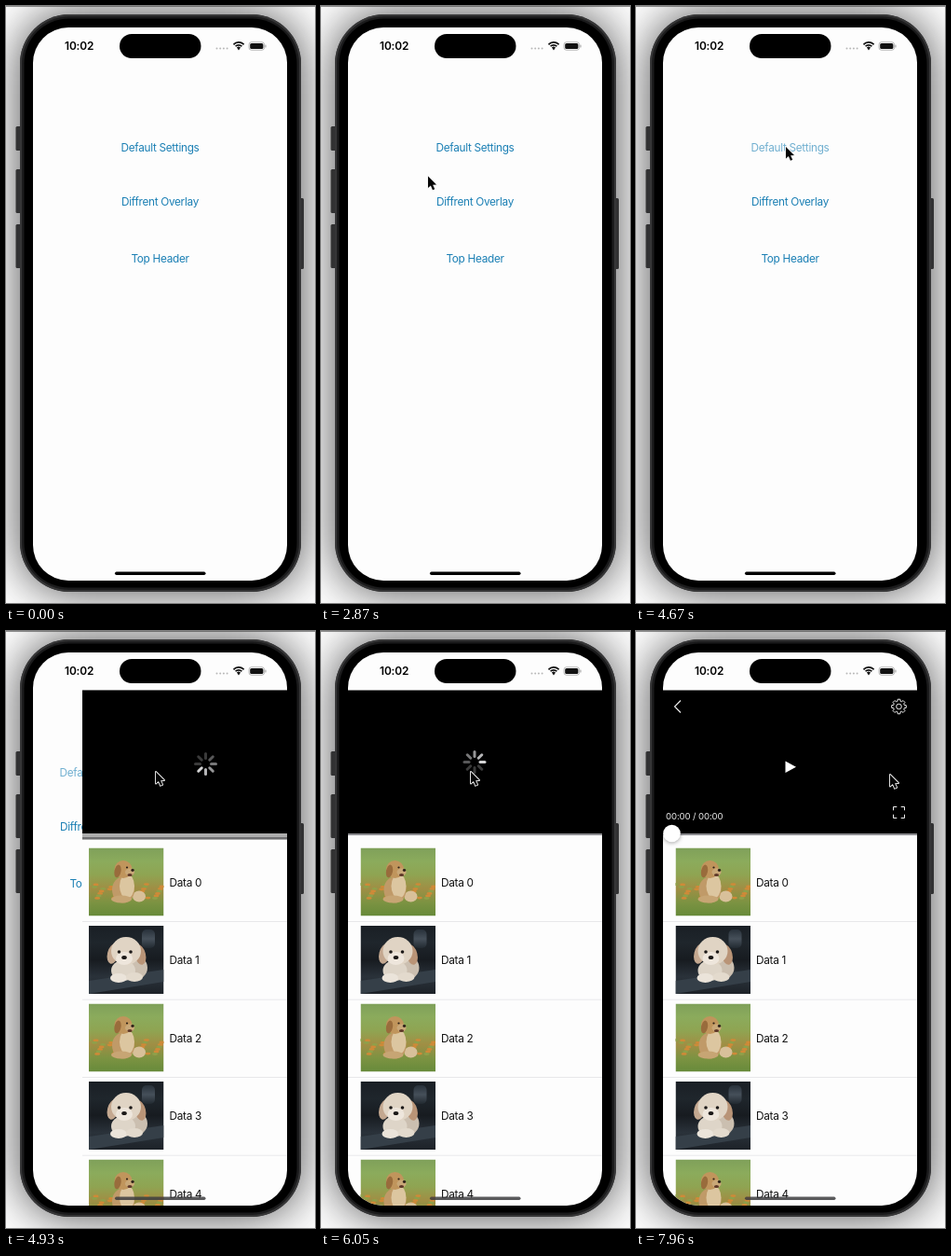
Recreate the animation shown at these times as an HTML page with a canvas. Size 332 px wide and 640 px high, loop 8 s.

```html
<!DOCTYPE html>
<html lang="en">
<head>
<meta charset="utf-8">
<title>Phone demo</title>
<style>
html, body { margin: 0; width: 100%; height: 100%; overflow: hidden; background: #fff; }
canvas { display: block; width: 332px; height: 640px; }
</style>
</head>
<body>
<canvas id="stage"></canvas>
<script>
const W = 332, H = 640, LOOP = 8000;
const canvas = document.getElementById('stage');
const ctx = canvas.getContext('2d');
const scale = window.devicePixelRatio || 1;
canvas.width = W * scale;
canvas.height = H * scale;

const SCREEN = { x: 29, y: 23, w: 273, h: 593, r: 38 };
const PAPER = '#fdfdfd', TINT = '#1a7fb4', LIGHT = '#eeeeee';
const PRESS = 4500, PUSH = 4750, PUSHED = 5180, SETTLE = 5330, READY = 6800;

// time, x, y of the pointer tip
const POINTER = [
  [2540, 30, 262], [2870, 115, 182.5], [3250, 116, 180], [4050, 161, 151],
  [7050, 161, 151], [7640, 252, 158], [7960, 273, 154]
];

const clamp = v => Math.max(0, Math.min(1, v));
const mix = (a, b, k) => a + (b - a) * k;
const smooth = k => k * k * (3 - 2 * k);

function box(x, y, w, h, color, r = 0) {
  ctx.fillStyle = color;
  ctx.beginPath();
  ctx.roundRect(x, y, w, h, r);
  ctx.fill();
}

function oval(x, y, rx, ry, color, turn = 0) {
  ctx.fillStyle = color;
  ctx.beginPath();
  ctx.ellipse(x, y, rx, ry, turn, 0, Math.PI * 2);
  ctx.fill();
}

function trace(points, close) {
  ctx.beginPath();
  points.forEach(([x, y], i) => i ? ctx.lineTo(x, y) : ctx.moveTo(x, y));
  if (close) ctx.closePath();
}

function text(str, x, y, { size = 11.8, weight = 400, color = '#111', align = 'left', gap = -0.3 } = {}) {
  ctx.font = `${weight} ${size}px Inter, Roboto, sans-serif`;
  ctx.letterSpacing = gap + 'px';
  ctx.textAlign = align;
  ctx.fillStyle = color;
  ctx.fillText(str, x, y);
}

function shade(y0, y1, ...colors) {
  const g = ctx.createLinearGradient(0, y0, 0, y1);
  colors.forEach((c, i) => g.addColorStop(i / (colors.length - 1), c));
  return g;
}

function drawBody() {
  box(0, 0, W, H, '#fff');
  ctx.save();
  ctx.shadowColor = 'rgba(16,16,18,.75)';
  ctx.shadowBlur = 50 * scale;
  box(15, 9, 302, 619, '#2b2b2c', 53);
  ctx.restore();
  box(0, 0, W, 1, 'rgba(40,40,40,.5)');
  for (const [x, y, h] of [[10.5, 129, 26], [10.5, 175, 47], [10.5, 234, 47], [314, 206, 76]]) {
    box(x, y, 6, h, '#323233', 1.5);
  }
  box(15, 9, 302, 619, '#363637', 53);
  box(17, 11, 298, 615, '#1b1b1c', 51);
  box(19.5, 13.5, 293, 610, '#000', 48);
}

function drawStatus(home) {
  text('10:02', 63, 47, { size: 11.9, weight: 600, color: '#000', gap: -0.15 });
  box(122, 30, 87.5, 26, '#000', 13);
  for (let i = 0; i < 4; i++) oval(226.5 + i * 3.7, 45.5, 1, 1, '#b8b8b8');

  ctx.strokeStyle = '#111';
  ctx.lineWidth = 1.7;
  for (const r of [4.7, 7.6]) {
    ctx.beginPath();
    ctx.arc(250, 46.5, r, -Math.PI * 0.76, -Math.PI * 0.24);
    ctx.stroke();
  }
  ctx.fillStyle = '#111';
  ctx.beginPath();
  ctx.moveTo(250, 47.5);
  ctx.arc(250, 46.5, 2.8, -Math.PI * 0.76, -Math.PI * 0.24);
  ctx.fill();

  ctx.strokeStyle = '#a4a4a4';
  ctx.lineWidth = 0.8;
  ctx.beginPath();
  ctx.roundRect(261, 38.8, 16.6, 8.4, 2.6);
  ctx.stroke();
  box(262.2, 40, 14.2, 6, '#111', 1.6);
  box(278.4, 41.6, 1.1, 2.8, '#a4a4a4', 0.5);

  box(117, 606.5, 97.5, 3.4, home, 1.7);
}

function drawMenu(pressed) {
  box(29, 23, 273, 593, PAPER);
  const items = [['Default Settings', 156], ['Diffrent Overlay', 214], ['Top Header', 275]];
  items.forEach(([label, y], i) => {
    ctx.globalAlpha = i === 0 ? mix(1, 0.62, pressed) : 1;
    text(label, 165.5, y, { color: TINT, align: 'center' });
  });
  ctx.globalAlpha = 1;
}

function meadowPup() {
  box(0, 0, 80.5, 73, shade(0, 73, '#7fa05a', '#8bab5c', '#8fa452', '#a08e44', '#7c9342', '#678a3a'));
  for (let i = 0; i < 34; i++) {
    oval((i * 31.7) % 80, 39 + (i * 7.3) % 17, 3, 1.4, i % 3 ? '#cf8a38' : '#8fa04a');
  }
  oval(54, 52, 7, 6, '#d8c09a');
  oval(37, 45, 12, 14, '#c09a68');
  oval(41, 41, 8, 13, '#dcc6a0');
  oval(35, 55, 11, 4, '#c7a574');
  oval(37, 23, 9.5, 9.5, '#c0955c');
  oval(44, 26, 5, 4, '#c9a878');
  oval(31, 25, 3.5, 7, '#996c3c', 0.2);
  oval(41, 21, 1.1, 1.1, '#2c2118');
  oval(47, 24, 1.7, 1.4, '#2c2118');
  oval(44, 29, 2.6, 1.5, '#5e3828');
}

function shadowPup() {
  box(0, 0, 80.5, 73, shade(0, 73, '#1a1f25', '#1f262c', '#171b20', '#2a323a', '#1d2228'));
  box(57, 4, 14, 20, shade(4, 24, '#28313a', '#46505a', '#222a31'), 5);
  trace([[0, 59], [80.5, 47], [80.5, 60], [0, 73]], true);
  ctx.fillStyle = '#353f48';
  ctx.fill();
  oval(49, 45, 14, 13, '#cbbfb0');
  oval(37, 48, 13, 11, '#ded5c8');
  oval(26, 30, 6, 11, '#c4a890', 0.25);
  oval(55, 31, 6, 11, '#b99477', -0.25);
  oval(40, 27, 16, 15, '#e0d4c4');
  oval(38, 35, 9, 7, '#eee6dc');
  for (const x of [32.5, 45]) oval(x, 28, 1.8, 1.8, '#1c1918');
  oval(38, 34, 2.8, 2, '#1c1918');
  oval(32, 56, 9, 5, '#ebe4da');
  oval(49, 55, 9, 5, '#e3dacd');
}

function drawRows(dx) {
  for (let i = 0; i < 5; i++) {
    const y = 232.5 + i * 83.5;
    ctx.save();
    ctx.translate(42.5 + dx, y);
    ctx.beginPath();
    ctx.rect(0, 0, 80.5, 73);
    ctx.clip();
    i % 2 ? shadowPup() : meadowPup();
    ctx.restore();
    text('Data ' + i, 129 + dx, y + 41, { color: '#111' });
    box(29 + Math.max(0, dx), y + 78.7, 273 + Math.min(0, dx), 0.8, '#e2e2e5');
  }
}

function drawSpinner(x, y, lead) {
  ctx.lineCap = 'round';
  ctx.lineWidth = 3;
  for (let i = 0; i < 8; i++) {
    const age = (((lead - i) % 8) + 8) % 8;
    const a = i * Math.PI / 4;
    const sx = Math.sin(a), sy = -Math.cos(a);
    ctx.strokeStyle = `rgba(230,230,232,${mix(0.92, 0.25, Math.min(1, age / 5))})`;
    trace([[x + sx * 6, y + sy * 6], [x + sx * 11, y + sy * 11]]);
    ctx.stroke();
  }
  ctx.lineCap = 'butt';
}

function drawGear(x, y) {
  const points = [];
  for (let i = 0; i < 8; i++) {
    [[-0.27, 6], [-0.17, 7.9], [0.17, 7.9], [0.27, 6]].forEach(([da, r]) => {
      const a = i * Math.PI / 4 + da;
      points.push([x + r * Math.cos(a), y + r * Math.sin(a)]);
    });
  }
  trace(points, true);
  ctx.stroke();
  ctx.beginPath();
  ctx.arc(x, y, 2.8, 0, Math.PI * 2);
  ctx.stroke();
}

function drawControls() {
  ctx.strokeStyle = LIGHT;
  ctx.lineWidth = 1.1;
  trace([[48, 74.5], [41.5, 81], [48, 87.5]]);
  ctx.stroke();
  ctx.lineWidth = 1;
  drawGear(282.5, 81);

  trace([[160.5, 139.5], [172, 145.8], [160.5, 152]], true);
  ctx.fillStyle = '#fff';
  ctx.fill();

  for (const [sx, sy] of [[-1, -1], [1, -1], [1, 1], [-1, 1]]) {
    const x = 282.5 + sx * 6, y = 194.5 + sy * 6;
    trace([[x - sx * 3.8, y], [x, y], [x, y - sy * 3.8]]);
    ctx.stroke();
  }
  text('00:00 / 00:00', 32, 201.5, { size: 9.6, color: LIGHT, gap: -0.1 });

  ctx.save();
  ctx.shadowColor = 'rgba(0,0,0,.35)';
  ctx.shadowBlur = 4 * scale;
  ctx.shadowOffsetY = scale;
  oval(38.5, 217, 9.3, 9.3, '#fff');
  ctx.restore();
}

function drawPlayer(t) {
  const settled = t >= SETTLE;
  box(29, 23, 273, 593, PAPER);
  drawRows(settled ? 0 : -6.5);
  if (settled) {
    box(29, 63.5, 273, 153.5, '#000');
    box(29, 217, 273, 2, '#8c8c90');
  } else {
    box(29, 63.5, 273, 160.5, '#adadad');
    box(29, 63.5, 267, 153.5, '#000');
    box(29, 221.3, 260, 1.5, '#5a5a5c');
  }
  if (t >= READY) drawControls();
  else if (settled) drawSpinner(165, 140.5, 2 + Math.floor((t - 6000) / 125));
  else drawSpinner(161.5, 142.5, 7 + Math.floor((t - 5150) / 125));
}

function drawPointer(t) {
  if (t < POINTER[0][0]) return;
  let i = 0;
  while (i < POINTER.length - 2 && t >= POINTER[i + 1][0]) i++;
  const [t0, x0, y0] = POINTER[i], [t1, x1, y1] = POINTER[i + 1];
  const k = smooth(clamp((t - t0) / (t1 - t0)));
  ctx.save();
  ctx.translate(mix(x0, x1, k), mix(y0, y1, k));
  trace([[0, 0], [0, 12.6], [2.9, 10], [5, 14.8], [7.2, 13.8], [5.1, 9.2], [9, 9]], true);
  ctx.lineJoin = 'round';
  ctx.lineWidth = 1.8;
  ctx.strokeStyle = '#f4f4f4';
  ctx.stroke();
  ctx.fillStyle = '#050505';
  ctx.fill();
  ctx.restore();
}

function draw(t) {
  ctx.setTransform(scale, 0, 0, scale, 0, 0);
  ctx.lineJoin = 'miter';
  drawBody();

  ctx.save();
  ctx.beginPath();
  ctx.roundRect(SCREEN.x, SCREEN.y, SCREEN.w, SCREEN.h, SCREEN.r);
  ctx.clip();
  const push = 1 - Math.pow(1 - clamp((t - PUSH) / (PUSHED - PUSH)), 3);
  if (push < 1) {
    ctx.save();
    ctx.translate(-SCREEN.w * 0.3 * push, 0);
    drawMenu(clamp((t - PRESS) / 80));
    ctx.restore();
  }
  if (push > 0) {
    ctx.save();
    ctx.translate(SCREEN.w * (1 - push), 0);
    drawPlayer(t);
    ctx.restore();
  }
  drawStatus(push > 0.5 ? 'rgba(62,62,64,.85)' : '#000');
  ctx.restore();

  drawPointer(t);
}

const start = performance.now();
function tick() {
  draw((performance.now() - start) % LOOP);
  requestAnimationFrame(tick);
}
tick();
</script>
</body>
</html>
```
